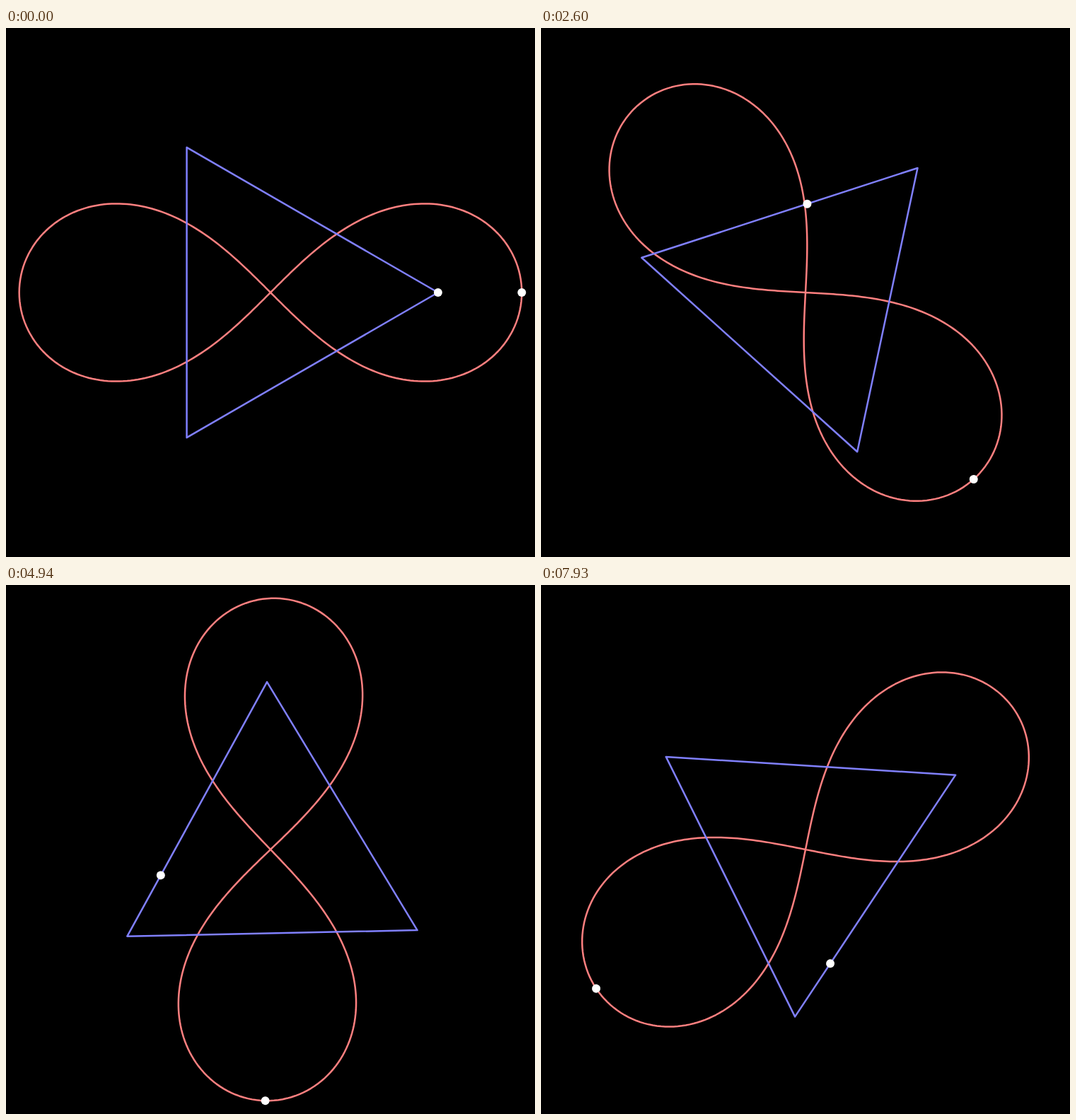
Write an HTML page that moves like this. It is 748 px wide and 748 px high and loops after 8000 ms.

```html
<!DOCTYPE html>
<html lang="en">
<head>
<meta charset="utf-8">
<title>Counter-rotating curve and triangle</title>
<style>
  html, body { margin: 0; width: 100%; height: 100%; overflow: hidden; background: #000; }
  svg { display: block; width: 100vw; height: 100vh; }
  path { fill: none; stroke-width: 2.5; stroke-linejoin: round; }
  circle { fill: #fff; }
</style>
</head>
<body>
<svg viewBox="-374 -374 748 748">
  <path id="curve" stroke="#ff8080"/>
  <path id="triangle" stroke="#8080ff"/>
  <circle id="tip" r="6"/>
  <circle id="runner" r="6"/>
</svg>
<script>
  const LOOP = 8000, STEP = 130;   // ms
  const TURN = 150;                // steps in a full turn
  const SIDE = TURN / 3;           // steps the runner spends on one side
  const A = 355.3, R = A * 2 / 3;

  const [curve, triangle, tip, runner] =
    ['curve', 'triangle', 'tip', 'runner'].map(id => document.getElementById(id));

  const polar = (r, deg) => {
    const a = deg * Math.PI / 180;
    return [r * Math.cos(a), r * Math.sin(a)];
  };

  // Lemniscate of Bernoulli
  const lemniscate = deg => {
    const [c, s] = polar(1, deg);
    const k = A / (1 + s * s);
    return [k * c, k * s * c];
  };

  const closedPath = points =>
    'M' + points.map(p => p.map(v => v.toFixed(2)).join()).join('L') + 'Z';

  const corner = i => polar(R, -120 * i);

  const onTriangle = step => {
    const i = Math.floor(step / SIDE), f = step / SIDE - i;
    const from = corner(i), to = corner(i + 1);
    return from.map((v, k) => v + (to[k] - v) * f);
  };

  const place = (el, deg, [x, y] = [0, 0]) =>
    el.setAttribute('transform', `rotate(${deg}) translate(${x} ${y})`);

  curve.setAttribute('d', closedPath(Array.from({ length: 360 }, (_, i) => lemniscate(i))));
  triangle.setAttribute('d', closedPath([0, 1, 2].map(corner)));

  function draw() {
    const step = Math.floor(performance.now() % LOOP / STEP);
    const deg = step * 360 / TURN;
    place(curve, deg);
    place(tip, deg, [A, 0]);
    place(triangle, -deg);
    place(runner, -deg, onTriangle(step));
    requestAnimationFrame(draw);
  }
  draw();
</script>
</body>
</html>
```
